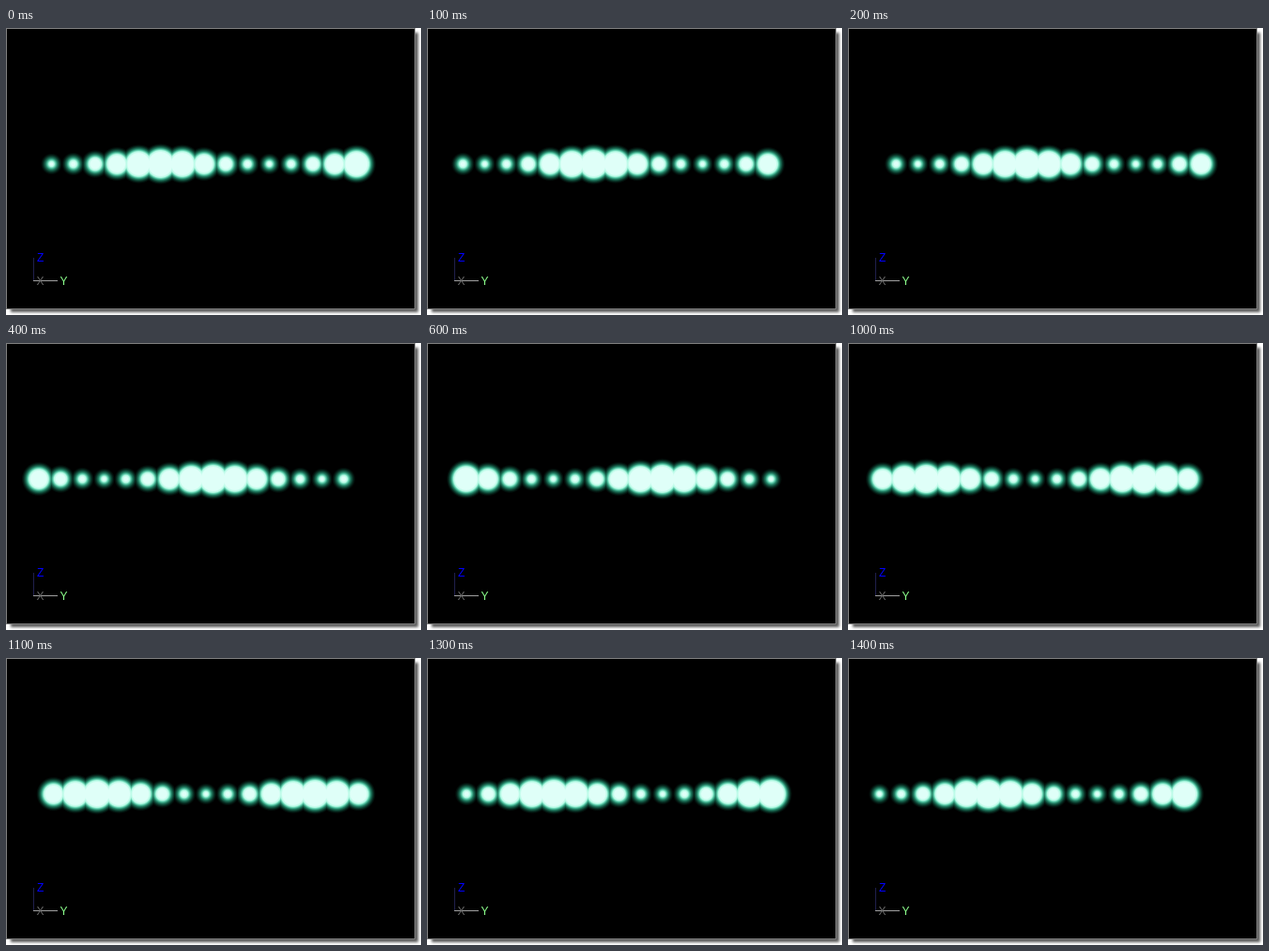
An HTML page for the animation above (1.5 s loop, 442x306 px).

```html
<!DOCTYPE html>
<html lang="en">
<head>
<meta charset="utf-8">
<title>Pulsing particle stream</title>
<style>
html, body { margin: 0; width: 100%; height: 100%; overflow: hidden; background: #fff; }
svg { display: block; }
text { font: 12px "Liberation Sans", Arial, sans-serif; }
#dots { isolation: isolate; }
#dots circle { mix-blend-mode: lighten; }
</style>
</head>
<body>
<svg id="stage" width="442" height="306" viewBox="0 0 442 306">
  <defs>
    <filter id="soft" x="-5%" y="-5%" width="110%" height="110%"><feGaussianBlur stdDeviation="1.8"/></filter>
  </defs>
  <rect x="5" y="5" width="434" height="298" fill="#000" opacity=".65" filter="url(#soft)"/>
  <rect x=".5" y=".5" width="435" height="299" fill="#000" stroke="#808080"/>
  <g id="dots"></g>
  <g fill="none" shape-rendering="crispEdges">
    <path d="M29.5 245V269" stroke="#20204c"/>
    <path d="M29 269.5H55" stroke="#a0a0a0"/>
  </g>
  <text x="33" y="249" fill="#00f">Z</text>
  <text x="32.5" y="274" fill="#666">X</text>
  <text x="57.5" y="274" fill="#8cff8c">Y</text>
</svg>
<script>
const NS = "http://www.w3.org/2000/svg";
const COUNT = 15, GAP = 23.2, PERIOD = 10, LEFT = 29.5, MID = 145;
const STEP = 100, LOOP = 1500;
// [time, x of the smallest dot]
const path = [[0, 48.5], [200, 74.5], [400, 104.5], [600, 134.5], [800, 172],
  [1100, 213], [1300, 251], [1400, 265.5], [1500, 280.5]];

const make = (tag, attrs, parent) => {
  const el = document.createElementNS(NS, tag);
  for (const k in attrs) el.setAttribute(k, attrs[k]);
  return parent.appendChild(el);
};

const defs = document.querySelector("defs");
const layer = document.getElementById("dots");

// One glow gradient per size in the repeating pattern
const radii = Array.from({ length: PERIOD }, (_, k) => {
  const wave = Math.cos(2 * Math.PI * k / PERIOD);
  const core = 8.6 - 5.8 * wave, outer = 16.8 - 5.2 * wave;
  const halo = outer - core;
  const grad = make("radialGradient", { id: "glow" + k }, defs);
  const stops = [
    [Math.max(core - 2, 1.2), "#dffff8"],
    [core, "#b4fae4"],
    [core + halo * .18, "#58c8a6"],
    [core + halo * .38, "#217d62"],
    [core + halo * .62, "#0b3b2d"],
    [core + halo * .82, "#03130e"],
    [outer, "#000"]
  ];
  for (const [r, color] of stops) make("stop", { offset: r / outer, "stop-color": color }, grad);
  return outer;
});

const dots = Array.from({ length: COUNT }, () => make("circle", { cy: MID }, layer));

function phase(t) {
  const i = path.findIndex(p => p[0] > t);
  const [t0, x0] = path[i - 1], [t1, x1] = path[i];
  return x0 + (x1 - x0) * (t - t0) / (t1 - t0);
}

function draw(ms) {
  const small = phase(Math.floor(ms % LOOP / STEP) * STEP);
  const first = Math.ceil((LEFT - small) / GAP);
  dots.forEach((dot, i) => {
    const n = first + i;
    const k = (n % PERIOD + PERIOD) % PERIOD;
    dot.setAttribute("cx", small + n * GAP);
    dot.setAttribute("r", radii[k]);
    dot.setAttribute("fill", `url(#glow${k})`);
  });
}

const start = performance.now();
function tick() {
  draw(performance.now() - start);
  requestAnimationFrame(tick);
}
tick();
</script>
</body>
</html>
```
